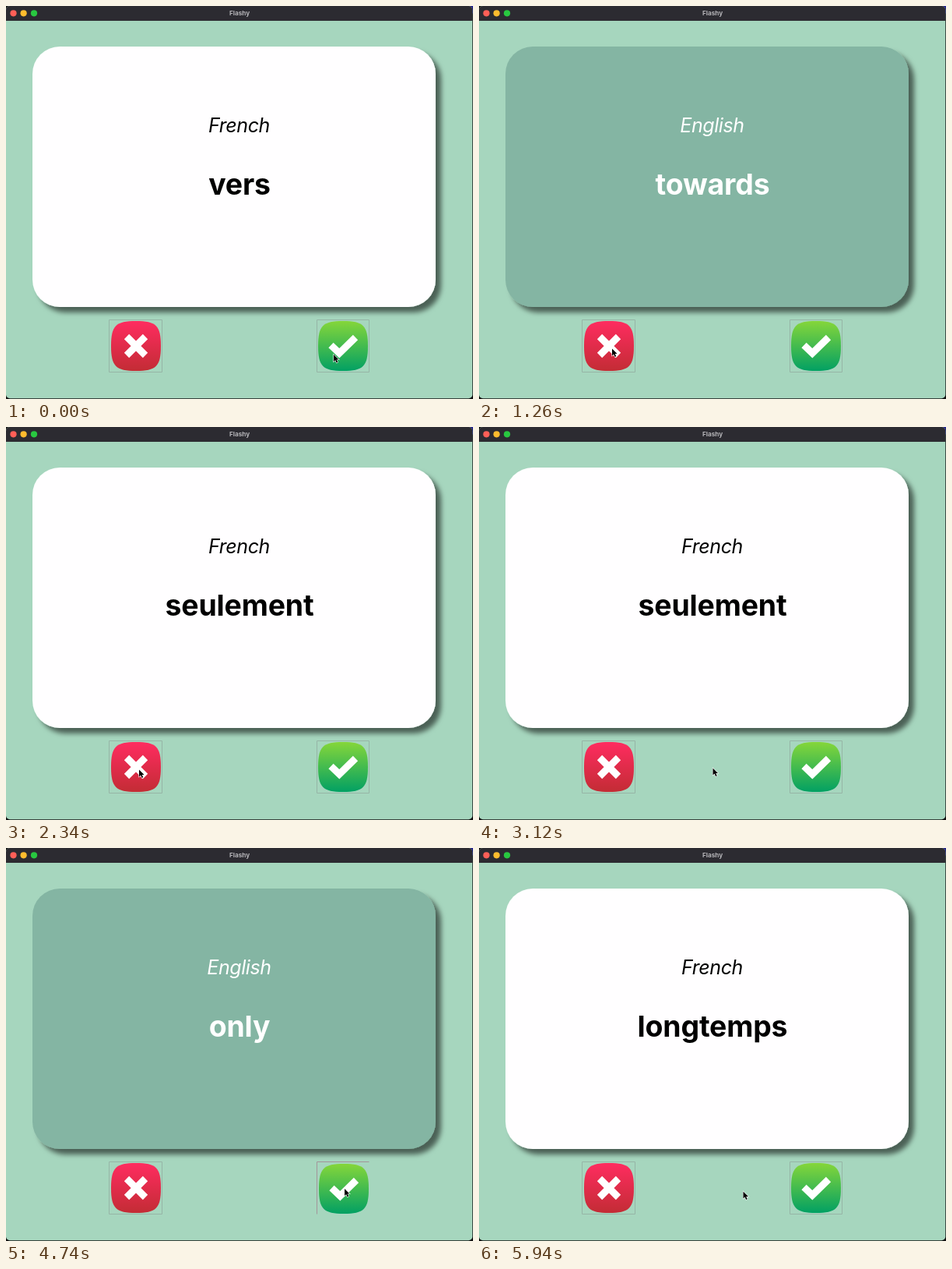
Recreate the animation shown at these times as an HTML page. Size 600x504 px, loop 6 s.

```html
<!DOCTYPE html>
<html lang="en">
<head>
<meta charset="utf-8">
<title>Flashy</title>
<style>
  html, body { margin: 0; width: 100%; height: 100%; overflow: hidden; background: #111; }
  svg { display: block; width: 600px; height: 504px; }
  text { font-family: Inter, "Liberation Sans", sans-serif; text-anchor: middle; }
  #title { font-size: 8.2px; font-weight: 700; fill: #b5b4b8; }
  #language { font-size: 25px; font-style: italic; letter-spacing: -.4px; }
  #word { font-size: 37.4px; font-weight: 700; letter-spacing: -.15px; }
  .border { fill: none; stroke: #96b5a6; }
  .mark { fill: none; stroke: #fff; stroke-width: 9; }
  .pressed .border { stroke: #a39499; stroke-dasharray: 134 400; }
  .pressed .icon { transform: translate(1px, 1px); }
</style>
</head>
<body>
<svg viewBox="0 0 600 504">
  <defs>
    <linearGradient id="red" x2="0" y2="1">
      <stop stop-color="#ff2c60"/><stop offset="1" stop-color="#c32c35"/>
    </linearGradient>
    <linearGradient id="green" x2="0" y2="1">
      <stop stop-color="#85d63a"/><stop offset="1" stop-color="#02a063"/>
    </linearGradient>
    <filter id="shadow" x="-5%" y="-5%" width="110%" height="115%">
      <feDropShadow dx="7" dy="7" stdDeviation="3.4" flood-opacity=".55"/>
    </filter>
    <clipPath id="window"><rect width="599.3" height="503.2" rx="5"/></clipPath>
    <path id="tile" d="M-32 0C-32-26-26-32 0-32S32-26 32 0 26 32 0 32-32 26-32 0Z"/>
  </defs>
  <path d="M590 0h10v10z" fill="#20208c"/>
  <g clip-path="url(#window)">
    <rect width="600" height="504" fill="#a6d6be"/>
    <rect width="600" height="19" fill="#2c2b31"/>
    <circle cx="9.5" cy="9.3" r="4.1" fill="#ff5f57"/>
    <circle cx="22.6" cy="9.3" r="4.1" fill="#febc2e"/>
    <circle cx="36" cy="9.3" r="4.1" fill="#28c840"/>
    <text id="title" x="300" y="12">Flashy</text>
  </g>
  <rect id="card" x="34" y="52" width="518" height="334" rx="35" filter="url(#shadow)"/>
  <g id="caption">
    <text id="language" x="299.5" y="162.3"></text>
    <text id="word" x="300" y="242"></text>
  </g>
  <g id="wrong" transform="translate(167 436)">
    <path class="border" d="M-34.5 33.5V-33.5H33.5V33.5Z"/>
    <g class="icon">
      <use href="#tile" fill="url(#red)"/>
      <path class="mark" d="M-12-12 12 12M12-12-12 12"/>
    </g>
  </g>
  <g id="right" transform="translate(433 436)">
    <path class="border" d="M-33.5 33.5V-33.5H33.5V33.5Z"/>
    <g class="icon">
      <use href="#tile" fill="url(#green)"/>
      <path class="mark" d="M-15.5-1-4.7 9.3 16-11"/>
    </g>
  </g>
  <path id="cursor" d="M0 0V9L2.1 7.1 3.6 10.5 5.2 9.8 3.7 6.5H6.5Z"
        stroke="#fff" stroke-width="1.1" paint-order="stroke"/>
</svg>
<script>
  const LOOP = 6000, STEP = 60;
  const $ = id => document.getElementById(id);

  // [start, language, word]
  const cards = [
    [0, "French", "vers"],
    [1020, "English", "towards"],
    [2280, "French", "seulement"],
    [4320, "English", "only"],
    [4800, "French", "longtemps"]
  ];
  // [start, end, x, y]
  const moves = [
    [0, 0, 421, 447],
    [180, 900, 171, 439.5],
    [2460, 3000, 300.5, 437.5],
    [4140, 4620, 435, 437],
    [5100, 5700, 339.5, 440.5]
  ];

  const ease = p => p * p * (3 - 2 * p);

  function cursorAt(t) {
    let [, , x, y] = moves[0];
    for (const [start, end, toX, toY] of moves.slice(1)) {
      const p = ease(Math.min(1, Math.max(0, (t - start) / (end - start))));
      x += (toX - x) * p;
      y += (toY - y) * p;
    }
    return [x, y];
  }

  function draw(t) {
    const [, language, word] = cards.findLast(card => card[0] <= t);
    const front = language === "French";
    $("card").setAttribute("fill", front ? "#fffeff" : "#84b5a3");
    $("caption").setAttribute("fill", front ? "#000" : "#fff");
    $("language").textContent = language;
    $("word").textContent = word;
    $("wrong").classList.toggle("pressed", t >= 2160 && t < 2280);
    $("right").classList.toggle("pressed", t >= 4680 && t < 4800);
    $("cursor").setAttribute("transform", `translate(${cursorAt(t)})`);
  }

  function tick() {
    draw(Math.floor(performance.now() % LOOP / STEP) * STEP);
    requestAnimationFrame(tick);
  }
  tick();
</script>
</body>
</html>
```
